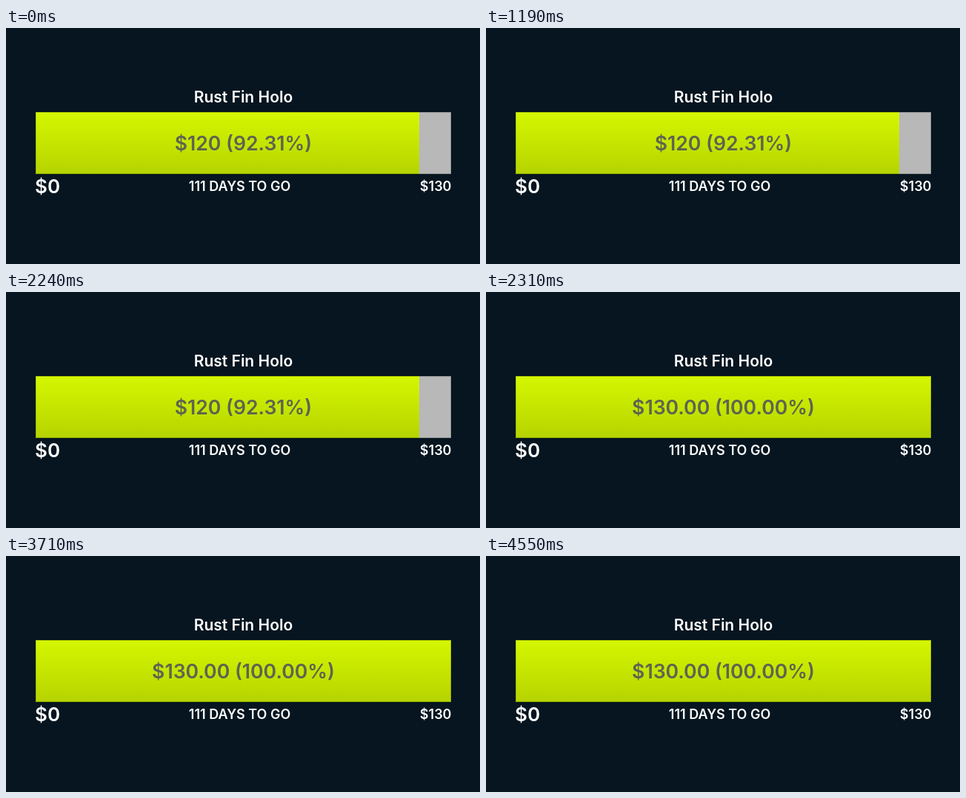
These frames come from a looping animation (640x320 px, 4.69 s). An HTML page:

```html
<!DOCTYPE html>
<html lang="en">
<head>
<meta charset="utf-8">
<title>Savings goal</title>
<style>
  html, body { margin: 0; width: 100%; height: 100%; overflow: hidden; background: #06151f; }
  svg { display: block; width: 640px; height: 320px; }
  text { font: 600 18px Inter, Roboto, sans-serif; fill: #fff; }
  .mid { text-anchor: middle; }
  .end { text-anchor: end; }
  #title { font-size: 21px; }
  #amount { font-size: 26.6px; fill: #5e6450; }
  #zero { font-size: 26px; }
</style>
</head>
<body>
<svg viewBox="0 0 640 320">
  <defs>
    <linearGradient id="lime" x2="0" y2="1">
      <stop offset="0" stop-color="#d4f700"/>
      <stop offset="1" stop-color="#b6d400"/>
    </linearGradient>
  </defs>
  <rect x="40" y="114" width="561" height="84" fill="#b8b8b8"/>
  <rect id="fill" x="40" y="114" height="84" fill="url(#lime)"/>
  <rect x="40.5" y="114.5" width="560" height="83" fill="none" stroke="#000" stroke-opacity=".18"/>
  <text id="title" class="mid" x="320.5" y="100.5">Rust Fin Holo</text>
  <text id="amount" class="mid" x="320.5" y="165.5"></text>
  <text id="zero" x="39" y="223.5">$0</text>
  <text class="mid" x="315.5" y="220.5">111 DAYS TO GO</text>
  <text class="end" x="601.5" y="220.5">$130</text>
</svg>
<script>
  const LOOP = 4690, PAID_AT = 2310, GOAL = 130, BAR = 561;
  const fill = document.getElementById('fill');
  const amount = document.getElementById('amount');
  let shown;

  function show(saved, label) {
    if (saved === shown) return;
    shown = saved;
    const part = saved / GOAL;
    fill.setAttribute('width', Math.round(BAR * part));
    amount.textContent = `$${label} (${(part * 100).toFixed(2)}%)`;
  }

  function draw(now) {
    if (now % LOOP < PAID_AT) show(120, '120');
    else show(130, '130.00');
    requestAnimationFrame(draw);
  }
  draw(performance.now());
</script>
</body>
</html>
```
